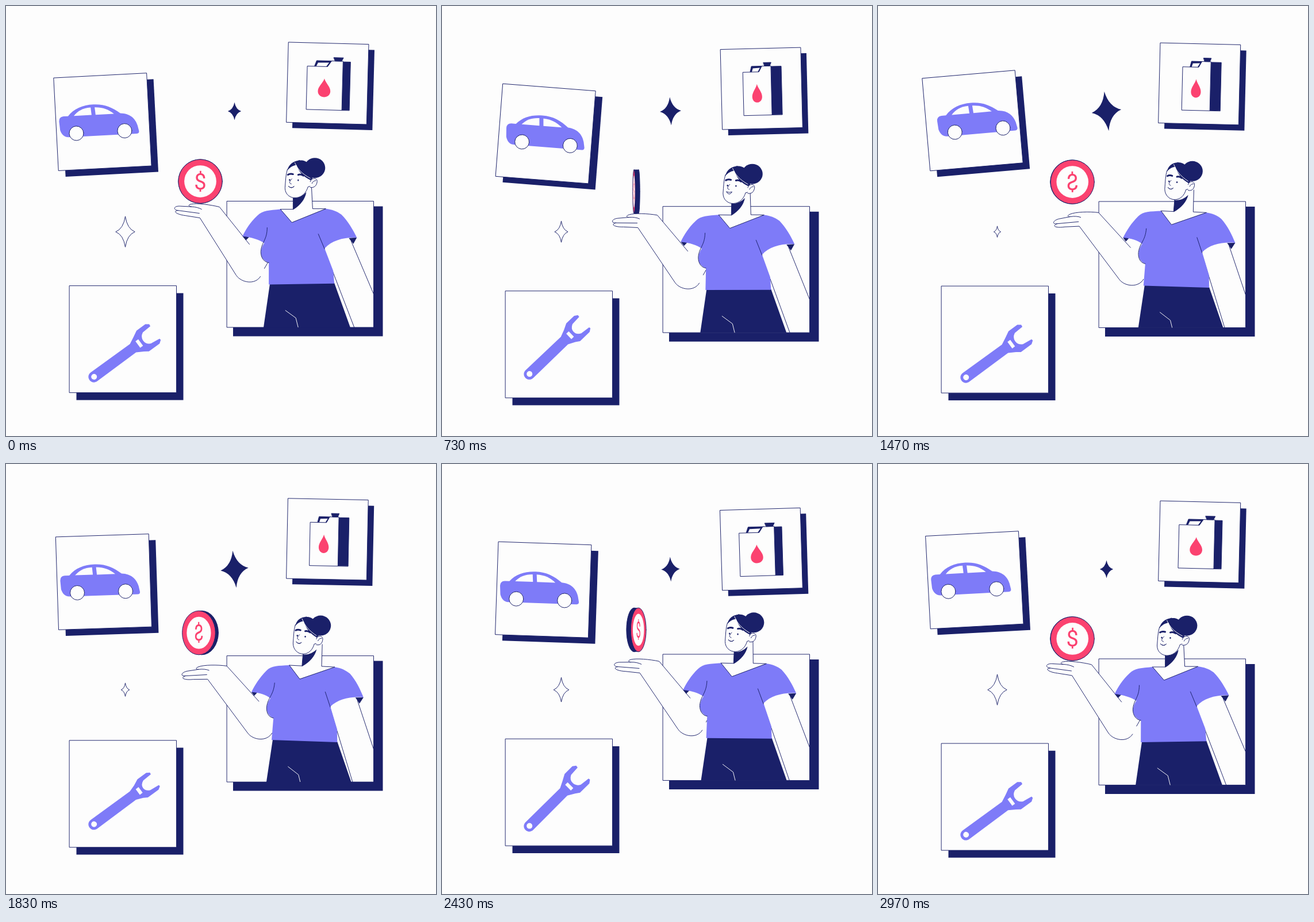
An HTML page with a canvas for the animation above (3000 ms loop, 748 by 748 pixels).

```html
<!DOCTYPE html>
<html lang="en">
<head>
<meta charset="utf-8">
<title>Car service</title>
<style>
  html, body { margin: 0; width: 100%; height: 100%; overflow: hidden; background: #fdfdfd; }
  canvas { display: block; width: 100vw; height: 100vh; }
</style>
</head>
<body>
<canvas id="stage" width="748" height="748"></canvas>
<script>
const ctx = document.getElementById('stage').getContext('2d');
const WHITE = '#fdfdfd', NAVY = '#1a2069', VIOLET = '#7e7bf8', PINK = '#fb4270';
const LOOP = 3000, TAU = Math.PI * 2, DEG = Math.PI / 180;

// Motion helpers
const wave = (t, peak, period) => Math.cos(TAU * (t - peak) / period);
const ease = (t, a, b) => {
  const u = Math.min(1, Math.max(0, (t - a) / (b - a)));
  return 0.5 - 0.5 * Math.cos(Math.PI * u);
};
const bump = (t, mid, half) => ease(t, mid - half, mid) - ease(t, mid, mid + half);

// Drawing helpers
const OPS = { M: 'moveTo', L: 'lineTo', Q: 'quadraticCurveTo', C: 'bezierCurveTo', Z: 'closePath' };
const same = (x, y) => [x, y];

function ink(fill, stroke, width = 0.95) {
  if (fill) { ctx.fillStyle = fill; ctx.fill(); }
  if (stroke) { ctx.strokeStyle = stroke; ctx.lineWidth = width; ctx.stroke(); }
}

function shape(d, fill, stroke, map = same, width) {
  ctx.beginPath();
  for (const [, op, args] of d.matchAll(/([MLQCZ])([^MLQCZ]*)/g)) {
    const n = (args.match(/-?[\d.]+/g) || []).map(Number), p = [];
    for (let i = 0; i < n.length; i += 2) p.push(...map(n[i], n[i + 1]));
    ctx[OPS[op]](...p);
  }
  ink(fill, stroke, width);
}

function oval(x, y, rx, ry, fill, stroke, width) {
  ctx.beginPath();
  ctx.ellipse(x, y, rx, ry, 0, 0, TAU);
  ink(fill, stroke, width);
}

function box(x, y, w, h, fill, stroke) {
  ctx.beginPath();
  ctx.rect(x, y, w, h);
  ink(fill, stroke);
}

function group(x, y, angle, draw) {
  ctx.save();
  ctx.translate(x, y);
  ctx.rotate(angle);
  draw();
  ctx.restore();
}

// Square card held by its lower left corner
function card(x, y, angle, size, dx, dy, content) {
  group(x + dx, y + dy, angle, () => box(0, -size, size, size, NAVY));
  group(x, y, angle, () => {
    box(0, -size, size, size, WHITE, NAVY);
    content();
  });
}

function drawCar() {
  shape('M-21 -30.5 L-13 -30.5 C-2 -43 13 -48.5 32 -48.5 C51 -48.5 64 -42 78 -31 ' +
    'C95 -30 104 -20 107 -8 L109 2 Q109 6 105 6 L-13 6 C-22 6 -26 0 -28 -7 L-29 -22 Q-29 -30 -21 -30.5 Z', VIOLET);
  shape('M-3 -30.5 C5 -39 13 -43 27 -43.5 L28 -30.5 Z', WHITE);
  shape('M34 -43.5 C48 -43 57 -39 67 -30.5 L35 -30.5 Z', WHITE);
  oval(0, 0, 12.5, 12.5, WHITE, NAVY);
  oval(84, 0, 12.5, 12.5, WHITE, NAVY);
}

function carCard(t) {
  const a = TAU * t / LOOP;
  const turn = -0.2 + Math.cos(a) + 0.8 * Math.sin(a) - 3.8 * Math.cos(2 * a) + 0.33 * Math.sin(2 * a);
  const y = 291.5 - 5.5 * wave(t, 100, 1500);
  const drive = ease(t, 450, 1080) - ease(t, 1370, 1820);
  card(92.4 + 0.25 * turn, y, turn * DEG, 161.6, 12, 10.5, () =>
    group(34.2 + 16 * drive, -63.3, 0, drawCar));
}

function drawCan(k) {
  const w = 62 - 13 * k, d = 13 + 5 * k;
  const fx = (x, y) => [x * w, y];
  ctx.translate(-(w + d) / 2, 0);
  shape(`M${w} 0 L${w} -84 L${w + d} -84 L${w + d} 0 Z`, NAVY, NAVY);
  shape(`M${0.2 + 0.06 * k} -75 L${0.26 + 0.05 * k} -85 L0.72 -85 L0.6 -75 Z`, NAVY, NAVY, fx);
  shape(`M${0.25 + 0.07 * k} -75 L${0.3 + 0.06 * k} -81.5 L0.61 -82 L0.53 -75 Z`, WHITE, null, fx);
  shape('M0 0 L0 -75 L0.57 -75 L0.68 -85 L1 -85 L1 0 Z', WHITE, NAVY, fx);
  shape('M0.74 -91 L1.01 -91 L0.96 -85 L0.78 -85 Z', NAVY, NAVY, fx);
  shape('M0.49 -54 C0.53 -46 0.665 -40 0.665 -32 C0.665 -18.5 0.315 -18.5 0.315 -32 C0.315 -40 0.45 -46 0.49 -54 Z',
    PINK, null, fx);
}

function fuelCard(t) {
  const turn = 1.75 * wave(t, 130, 1500);
  const y = 209 - 11 * wave(t, 220, 1500);
  const k = ease(t, 50, 600) - ease(t, 1700, 2550);
  card(488, y, turn * DEG, 139.4, 10, 10, () =>
    group(70 + 0.7 * turn + 2.2 * k, -23.7, 0, () => drawCan(k)));
}

function drawWrench(squeeze) {
  const head = (u, v) => [u, u > 90 ? v * (1 - 0.2 * squeeze) : v];
  shape('M0 -9.5 L84 -9 L96 -15 L107 -21 L126 -21 L131.5 -17 L131 -13 L114 -12 Q106 -8 106 0 Q106 8 114 12 ' +
    'L131 14 L131.5 17 L126 21 L103 21 L96 16 L84 9 L0 9.5 C-13 9.5 -13 -9.5 0 -9.5 Z', VIOLET, null, head);
  shape('M94.5 -7 L100.5 -7 L100.5 7 L94.5 7 Z', WHITE, null, head);
  oval(0, 0, 5, 5, WHITE);
}

function wrenchCard(t) {
  const y = 486.6 + 9.1 * wave(t, 750, LOOP), p = t % 1500;
  const swing = bump(p, 880, 590);
  const angle = -(36.3 + 8.7 * swing) * DEG;
  card(110.5, y + 186, 0, 186, 12, 12.8, () => {
    const cx = 95.5 - 7.5 * swing;
    const cy = -76.5 + 11 * wave(t, 1400, 1500);
    group(cx, cy, angle, () => {
      ctx.translate(-65.5, 0);
      drawWrench(bump(p, 490, 410));
    });
  });
}

function spark(x, y, h, ratio, angle, fill, stroke) {
  const b = h / 2, a = b * ratio, q = 0.2;
  group(x, y, angle, () => shape(
    `M0 ${-b} Q${a * q} ${-b * q} ${a} 0 Q${a * q} ${b * q} 0 ${b} Q${-a * q} ${b * q} ${-a} 0 Q${-a * q} ${-b * q} 0 ${-b} Z`,
    fill, stroke));
}

function coin(t) {
  const a = TAU * t / LOOP - 9 * DEG * bump(t, 430, 450);
  const c = Math.cos(a), side = Math.sin(a) * Math.sign(c) * 4;
  const r = 38.2, rx = Math.max(0.5, r * Math.abs(c) - 0.8 * Math.abs(Math.sin(a)));
  group(338, 305 + 17.8 * wave(t, 750, LOOP), 0, () => {
    oval(side, 0, rx, r, NAVY, NAVY);
    box(-Math.abs(side), -r, 2 * Math.abs(side), 2 * r, NAVY);
    ctx.translate(-side, 0);
    oval(0, 0, rx, r, PINK, NAVY);
    oval(0, 0, rx * 0.73, r * 0.73, WHITE);
    ctx.scale(c, 1);
    ctx.fillStyle = PINK;
    ctx.font = '38px Roboto, "Open Sans", sans-serif';
    ctx.textAlign = 'center';
    ctx.fillText('$', 0, 13.5);
  });
}

function drawArm(s, h) {
  const arm = (x, y) => [
    x + s * (13 + 8 * ease(y, 340, 490)),
    y + h * (1 + 23.5 * Math.exp((293 - x) / 75))
  ];
  const outline = 'M423 414 L371 349 C355 345 331 342 322 344 C316 345 317 348 322 348.5 L302 347.5 ' +
    'C291 347 290 354 299 355 C289 356 296 362 312 364 L337 368 L400 468 C409 481 433 485 442 470';
  shape(outline + ' L456 445 L450 405 Z', WHITE, null, arm);
  shape(outline, null, NAVY, arm);
  shape('M299 355 L336 360', null, NAVY, arm);
  shape('M322 348.5 Q333 349 340 353', null, NAVY, arm);
  shape('M449 456 L456 444', null, NAVY, arm);
}

function drawHead(s, talk) {
  const head = (x, y) => [x + s * (14 - 0.08 * (x - 490)), y + s * (2.5 + 0.08 * (x - 500))];
  const line = d => shape(d, null, NAVY, head);
  shape('M489 284 C486 294 486 304 485 316 C485 327 494 334 504 333 C515 332 522 324 525 314 L533 312 L532 280 L510 268 Z',
    WHITE, NAVY, head);
  shape('M489 286 C491 274 502 267 515 268 C528 270 534 282 532 304 L529 302 C518 297 510 290 505 276 C499 277 493 280 489 286 Z',
    NAVY, null, head);
  shape('M502 272 C507 283 514 291 529 299', null, WHITE, head);
  oval(...head(537, 281), 18, 17.5, NAVY);
  shape('M529 305 C531 297 542 298 541 305 C540 312 536 316 529 315', WHITE, NAVY, head);
  line('M532 308 Q534 303 539 303');
  shape('M490 293 Q494 290.5 499 292', null, NAVY, head, 3);
  shape('M508 293 Q513 291.5 517 294.5', null, NAVY, head, 3);
  oval(...head(493, 302), 1.2, 1.5, NAVY);
  oval(...head(508, 302.5), 1.2, 1.5, NAVY);
  line('M497 300 C493 304 491 308 496 309');
  line(`M491 313 Q496 ${318 + 4 * talk} 501 313 Q496 ${318 - 4 * talk} 491 313`);
}

function drawBody(s) {
  const body = (x, y) => [
    x + s * (Math.max(4.7, 14 - 0.083 * (y - 376)) + Math.max(0, 450 - x) * 0.1),
    y + s * (0.5 + 0.052 * Math.abs(x - 440))
  ];
  const line = (d, color = NAVY) => shape(d, null, color, body);

  ctx.save();
  ctx.beginPath();
  ctx.rect(384.5, 200, 255, 358.5);
  ctx.clip();
  shape('M459 482 L571 481 L599 559 L600 575 L446 575 L448 558 Z', NAVY, null, body);
  line('M486 529 L504 542 L509 562', WHITE);
  const [ax, ay] = body(543, 396), [bx, by] = body(600, 408);
  shape(`M${ax} ${ay} L${606 - 3 * s} 559`, null, NAVY);
  shape(`M${bx} ${by} L641 ${504 + 2 * s}`, null, NAVY);
  ctx.restore();

  shape('M411 400 L424 400 L417 407 Z', NAVY, null, body);
  shape('M596 403 L610 402 L604 413 Z', NAVY, null, body);
  shape('M477 353 L499 353 L499 328 L531 316 L533 352 L556 352 L497 376 Z', WHITE, null, body);
  shape('M499 333 Q512 334 522 323 Q519 341 499 354 Z', NAVY, null, body);
  shape('M477 353 C458 355 446 355 437 364 C424 376 417 388 411 400 C427 402 440 406 449 412 ' +
    'C441 423 440 440 457 446 L457 484 L571 482 L569 460 L554 421 C566 407 588 401 610 402 ' +
    'C603 388 595 374 583 362 C575 356 566 353 556 352 L497 376 Z', VIOLET, null, body);
  line('M477 353 L499 353 L499 330');
  line('M531 314 L533 352 L556 352 L497 376 L477 353');
  line('M454 385 C454 407 444 410 443 427 C443 438 449 445 457 446');
  line('M543 396 L554 422');
}

function woman(t) {
  const s = 0.5 - 0.52 * wave(t, 200, LOOP);
  const h = 0.5 - 0.5 * wave(t, -70, LOOP);
  group(0, 0.5 + 9.2 * wave(t, 750, LOOP), 0, () => {
    box(395, 348, 260.5, 226, NAVY);
    box(384.5, 339, 255, 219.5, WHITE, NAVY);
    ctx.save();
    ctx.setTransform(1, 0, 0, 1, 0, 0);
    coin(t);
    ctx.restore();
    drawArm(s, h);
    drawBody(s);
    drawHead(s, bump(t, 900, 500));
  });
}

function frame(now) {
  const t = now % LOOP, k = wave(t, 0, LOOP);
  ctx.setTransform(1, 0, 0, 1, 0, 0);
  ctx.lineJoin = ctx.lineCap = 'round';
  box(0, 0, 748, 748, WHITE);
  carCard(t);
  fuelCard(t);
  wrenchCard(t);
  spark(397.5, 183, 50 - 19 * k, 0.75, -3.2 * (1 - k) * DEG, NAVY);
  spark(207.5, 392.8, 36 + 17 * k, 0.63, 0, WHITE, NAVY);
  woman(t);
}

const start = performance.now();
function tick() {
  frame(performance.now() - start);
  requestAnimationFrame(tick);
}
tick();
</script>
</body>
</html>
```
